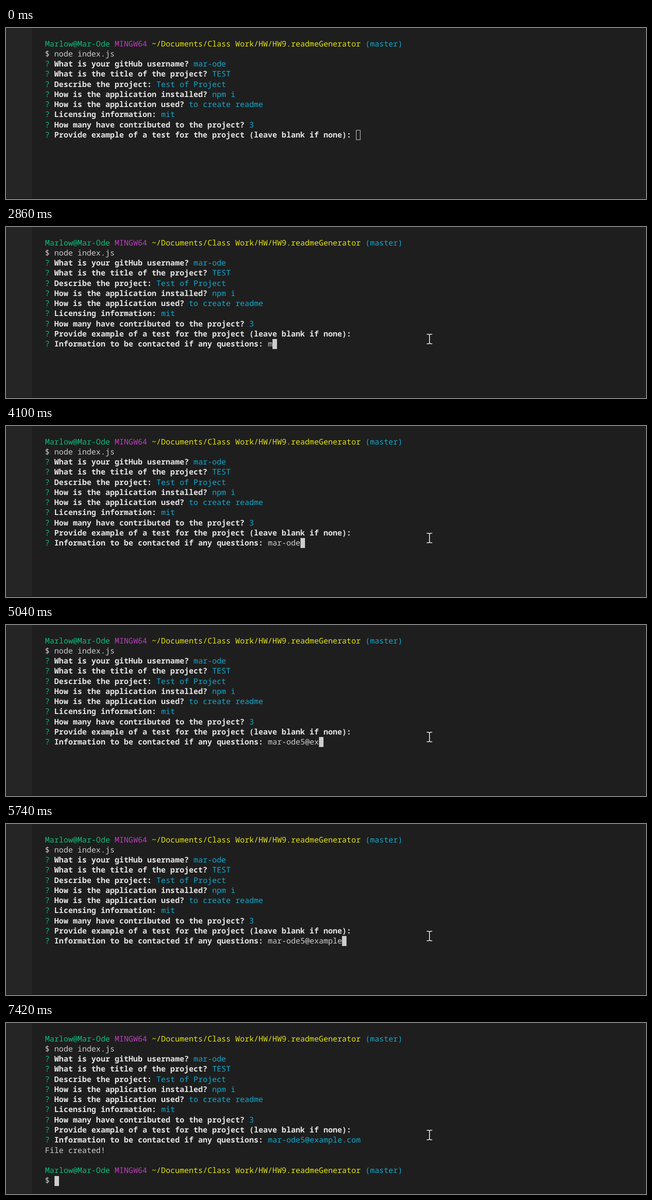
An HTML page that plays this animation: 1280x342 px, repeating every 8000 ms.

```html
<!DOCTYPE html>
<html lang="en">
<head>
<meta charset="utf-8">
<title>Readme generator</title>
<style>
  html, body { margin: 0; width: 100%; height: 100%; overflow: hidden; background: #1e1e1e; }
  svg { display: block; width: 1280px; height: 342px; }
  text {
    font: 15.475px "Noto Sans Mono", "DejaVu Sans Mono", monospace;
    text-rendering: geometricPrecision;
    white-space: pre;
  }
  .bold { font-weight: 700; }
</style>
</head>
<body>
<svg id="stage" viewBox="0 0 1280 342">
  <rect width="1280" height="342" fill="#1e1e1e"/>
  <rect width="52" height="342" fill="#252526"/>
  <rect y="341" width="1280" height="1" fill="#1a1518"/>
  <g id="lines"></g>
  <rect id="caret" stroke="#ccc"/>
  <g id="mouse" fill="none">
    <path d="M-5.5 -9.5h4l1.5 1.5l1.5 -1.5h4M-5.5 9.5h4l1.5 -1.5l1.5 1.5h4M0 -8v16" stroke="#111" stroke-width="3"/>
    <path d="M-5.5 -9.5h4l1.5 1.5l1.5 -1.5h4M-5.5 9.5h4l1.5 -1.5l1.5 1.5h4M0 -8v16" stroke="#fff" stroke-width="1.5"/>
  </g>
</svg>
<script>
const NS = "http://www.w3.org/2000/svg";
const LOOP = 8000, LEFT = 78, CELL = 9.285, ROW = 20.28, TOP = 21.6;
const GREEN = "#0dbc79", CYAN = "#11a8cd", PLAIN = "#cccccc", WHITE = "#e5e5e5";
const EMAIL = "mar-ode5@example.com";

const lines = document.getElementById("lines");
const caret = document.getElementById("caret");
const mouse = document.getElementById("mouse");

const colX = col => LEFT + col * CELL;
const rowY = row => TOP + row * ROW;
const show = (el, on) => el.setAttribute("visibility", on ? "visible" : "hidden");

function group() {
  return lines.appendChild(document.createElementNS(NS, "g"));
}

function put(parent, row, col, str, color, bold) {
  const el = document.createElementNS(NS, "text");
  el.setAttribute("x", colX(col));
  el.setAttribute("y", rowY(row) + 14.9);
  el.setAttribute("fill", color);
  if (bold) el.setAttribute("class", "bold");
  el.textContent = str;
  return parent.appendChild(el);
}

function prompt(parent, row) {
  put(parent, row, 0, "Marlow@Mar-Ode", GREEN);
  put(parent, row, 15, "MINGW64", "#bc3fbc");
  put(parent, row, 23, "~/Documents/Class Work/HW/HW9.readmeGenerator", "#e5e510");
  put(parent, row, 69, "(master)", CYAN);
}

function ask(parent, row, question, answer) {
  put(parent, row, 0, "?", GREEN);
  put(parent, row, 2, question, WHITE, true);
  return put(parent, row, question.length + 3, answer, CYAN);
}

const base = group();
prompt(base, 0);
put(base, 1, 0, "$ node index.js", PLAIN);
[
  ["What is your gitHub username?", "mar-ode"],
  ["What is the title of the project?", "TEST"],
  ["Describe the project:", "Test of Project"],
  ["How is the application installed?", "npm i"],
  ["How is the application used?", "to create readme"],
  ["Licensing information:", "mit"],
  ["How many have contributed to the project?", "3"]
].forEach(([q, a], i) => ask(base, i + 2, q, a));

const testLine = group();
ask(testLine, 9, "Provide example of a test for the project (leave blank if none):", "");
const mailLine = group();
const mail = ask(mailLine, 10, "Information to be contacted if any questions:", "");
const created = group();
put(created, 11, 0, "File created!", PLAIN);
const ending = group();
prompt(ending, 13);
put(ending, 14, 0, "$", PLAIN);

// [time, typed letters]; -1 is the blank line just before a redraw
const KEYS = [
  [1620, 0], [2860, 1], [2940, 2], [3070, 3],
  [3630, 4], [3770, -1], [3810, 5],
  [3970, 6], [4060, -1], [4100, 7], [4330, 8], [4610, 9],
  [4890, 10], [5000, -1], [5040, 11],
  [5180, 12], [5220, -1], [5260, 13],
  [5460, -1], [5500, 14], [5590, -1], [5630, 15], [5700, -1], [5740, 16],
  [5970, -1], [6020, 17],
  [6220, 18], [6260, -1], [6300, 19], [6370, -1], [6410, 20],
  [7120, -1], [7170, 20]
];

function typedAt(t) {
  let n = -1;
  for (const [time, count] of KEYS) if (t >= time) n = count;
  return n;
}

function caretCell(t, typed) {
  if (t < 1580) return [9, 67];
  if (t < 1620) return [9, 0];
  if (t >= 7420) return [14, 2];
  if (t >= 7170) return [12, 0];
  return [10, typed < 0 ? 0 : 48 + typed];
}

function drawCaret(row, col, focused) {
  const set = (k, v) => caret.setAttribute(k, v);
  set("x", Math.round(colX(col)) + 0.5);
  set("y", Math.round(rowY(row)) + 0.5);
  set("width", 8);
  set("height", 19);
  set("fill", focused ? PLAIN : "none");
}

function drawMouse(t) {
  const step = Math.floor((t - 30) / (480 / 9));
  const p = Math.max(0, Math.min(1, step / 8));
  const rest = (1 - p) ** 2;
  show(mouse, t >= 30);
  mouse.setAttribute("transform",
    `translate(${Math.round(847 + 116 * rest)} ${Math.round(224 + 76 * rest)})`);
}

function render(t) {
  const typed = typedAt(t);
  show(testLine, t < 1580 || t >= 1620);
  show(mailLine, typed >= 0);
  show(created, t >= 7170);
  show(ending, t >= 7420);
  mail.textContent = EMAIL.slice(0, Math.max(0, typed));
  mail.setAttribute("fill", t >= 7170 ? CYAN : PLAIN);
  drawCaret(...caretCell(t, typed), t >= 510);
  drawMouse(t);
}

const start = performance.now();
function tick() {
  render((performance.now() - start) % LOOP);
  requestAnimationFrame(tick);
}
render(0);
requestAnimationFrame(tick);
</script>
</body>
</html>
```
